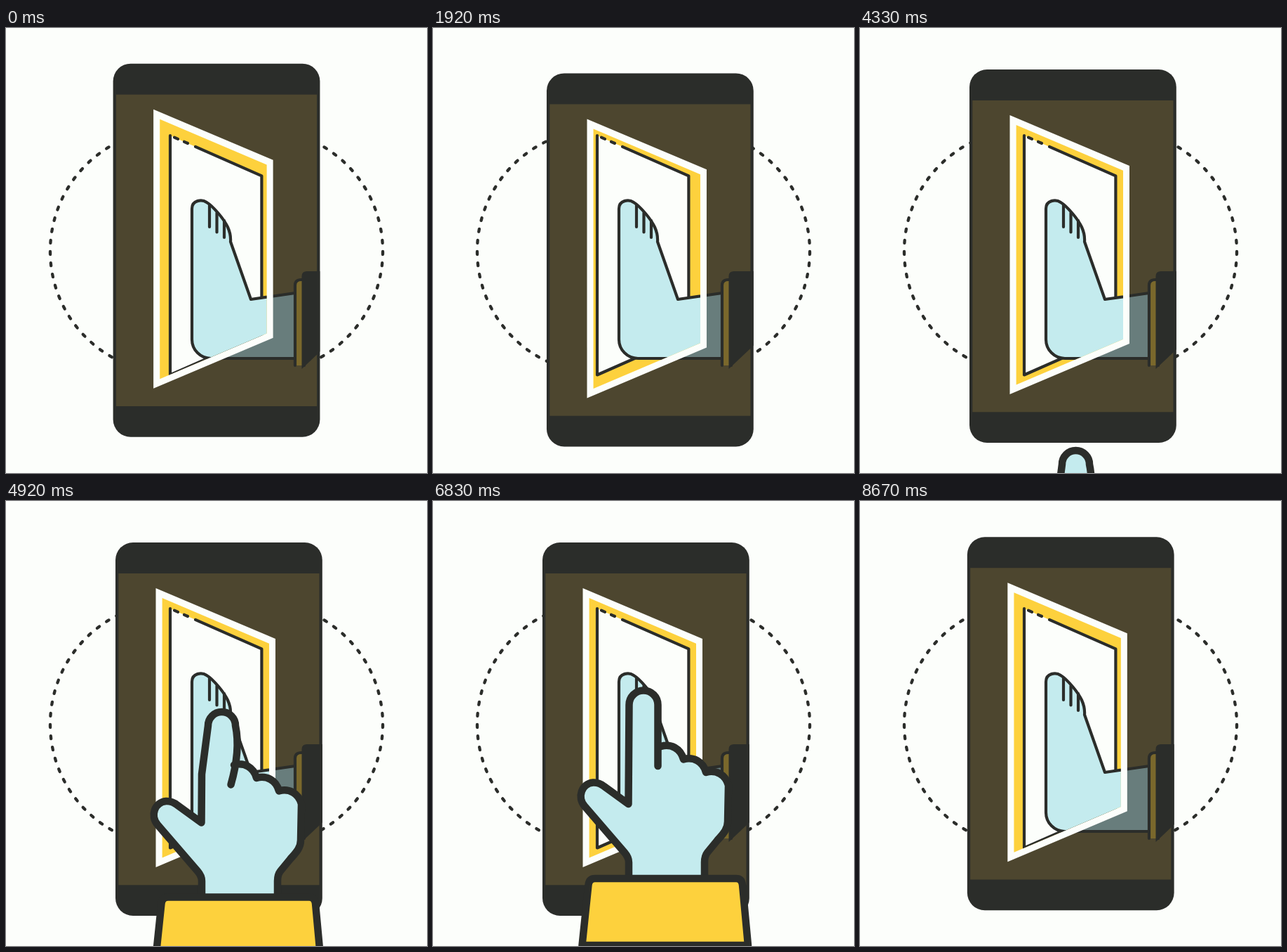
Recreate the animation shown at these times as an HTML page with a canvas. Size 600 by 633 pixels, loop 8760 ms.

```html
<!DOCTYPE html>
<html lang="en">
<head>
<meta charset="utf-8">
<title>Foot in the door</title>
<style>
html, body { margin: 0; width: 100%; height: 100%; overflow: hidden; background: #fcfefb; }
canvas { display: block; width: 600px; height: 633px; }
</style>
</head>
<body>
<canvas id="stage"></canvas>
<script>
const W = 600, H = 633, LOOP = 8760;
const INK = '#2b2d2a', PAPER = '#fcfefb', BROWN = '#4d462f', YELLOW = '#fdd13d',
      SKIN = '#c4ebee', SHADE = '#687d7c', OLIVE = '#7a682c';
const THIN = 4.2, BOLD = 10.5;

const canvas = document.getElementById('stage');
const ctx = canvas.getContext('2d');
const dpr = window.devicePixelRatio || 1;
canvas.width = W * dpr;
canvas.height = H * dpr;

const clamp = v => Math.max(0, Math.min(1, v));
const span = (t, a, b) => clamp((t - a) / (b - a));
const inOut = p => (1 - Math.cos(Math.PI * p)) / 2;
const outSine = p => Math.sin(p * Math.PI / 2);
const mix = (a, b, p) => a + (b - a) * p;

// The phone leaves its rest place, swings through three turning points and settles.
const SWAY_START = 7500;
const SWINGS = [
  { ms: 1560, x: -3.7, y: -9.1 },
  { ms: 850, x: 14.5, y: 24 },
  { ms: 1510, x: -2, y: -12 },
  { ms: 1060, x: 0, y: 0 }
];

function drift(t) {
  let u = (t - SWAY_START + LOOP) % LOOP;
  let from = { x: 0, y: 0 };
  for (const to of SWINGS) {
    if (u < to.ms) {
      const p = inOut(u / to.ms);
      return [mix(from.x, to.x, p), mix(from.y, to.y, p)];
    }
    u -= to.ms;
    from = to;
  }
  return [0, 0];
}

function fill(path, color) {
  ctx.fillStyle = color;
  ctx.fill(path);
}

function stroke(path, width) {
  ctx.strokeStyle = INK;
  ctx.lineWidth = width;
  ctx.stroke(path);
}

// Upright quad in perspective: both slanted edges close in by the same slope.
function door(left, right, top, bottom, slope) {
  const rise = (right - left) * slope;
  return new Path2D(
    `M${left} ${top}L${right} ${top + rise}V${bottom - rise}L${left} ${bottom}Z`);
}

const FRAME = door(213.5, 384, 124, 521, 0.422);
const HOLE = door(222.6, 375, 138, 507.5, 0.425);

const ROOM = { left: 234, right: 364.4, top: 153, bottom: 493.5, slope: 0.44 };
const OPENING = door(ROOM.left, ROOM.right, ROOM.top, ROOM.bottom, ROOM.slope);

function openingLine() {
  const { left, right, top, bottom, slope } = ROOM;
  const lintel = x => top + (x - left) * slope;
  const path = new Path2D(`M${left} ${top}V${bottom}` +
    `L${right} ${bottom - (right - left) * slope}V${lintel(right)}L270 ${lintel(270)}`);
  for (const x of [240, 254]) {
    path.moveTo(x, lintel(x));
    path.lineTo(x + 5, lintel(x + 5));
  }
  return path;
}
const OPENING_LINE = openingLine();

const FOOT = new Path2D(
  'M412 377L349 386L320 304C321 289 314 277 303 264C297 257 291 251 286 248' +
  'C279 243 265 245 265 257V443A27 27 0 0 0 292 470H412');
const TOES = new Path2D();
for (let i = 0; i < 3; i++) {
  TOES.moveTo(290 + 10.5 * i, 252 + 11 * i);
  TOES.lineTo(290 + 10.5 * i, 283 + 7.5 * i);
}
const CUFF = new Path2D('M412 480V366Q412 358 421 358H425V480');
const LEG = new Path2D('M421.5 485V353Q421.5 346 429 346H500V411Z');
const ARM = new Path2D(
  'M212.5 632L221.5 546Q222.5 537 231 537H432Q440 537 441 546L449 632Z');

function dottedRing() {
  ctx.save();
  ctx.strokeStyle = INK;
  ctx.lineWidth = 4.3;
  ctx.setLineDash([4, 12.2]);
  ctx.lineDashOffset = 2;
  for (const side of [-1, 1]) {
    ctx.save();
    ctx.translate(300, 317.5);
    ctx.scale(side, 1);
    for (const dir of [-1, 1]) {
      const first = 2.5 / 173;
      ctx.beginPath();
      ctx.arc(64, 0, 173, first, first + dir * 1.4, dir < 0);
      ctx.stroke();
    }
    ctx.restore();
  }
  ctx.restore();
}

function foot(color) {
  fill(FOOT, color);
  stroke(FOOT, THIN);
  stroke(TOES, THIN);
}

function phone(dx, dy) {
  const body = new Path2D();
  body.roundRect(156 + dx, 59 + dy, 294.8, 531, 25);
  fill(body, INK);
  ctx.fillStyle = BROWN;
  ctx.fillRect(160.3 + dx, 103 + dy, 286.2, 443.3);

  ctx.save();
  ctx.clip(body);
  foot(SHADE);
  fill(CUFF, OLIVE);
  stroke(CUFF, THIN);
  fill(LEG, INK);
  ctx.restore();

  // The frame travels with the phone; the room behind it stays put.
  ctx.save();
  ctx.translate(dx, dy);
  fill(FRAME, PAPER);
  ctx.clip(HOLE);
  ctx.translate(-dx, -dy);
  ctx.fillStyle = YELLOW;
  ctx.fillRect(0, 0, W, H);
  fill(OPENING, PAPER);
  stroke(OPENING_LINE, THIN);
  foot(SKIN);
  ctx.restore();
}

function thumbAndFinger(bend) {
  const path = new Path2D(
    'M279 540V514Q279 507 273 500L216 434C205 421 212 402 228 400.5' +
    'C235 400 239 402 244 406L278.5 431L279 362');
  path.arc(300 + 7.5 * bend, 290 + 3 * bend, 20.5 - bend, Math.PI, 0);
  path.quadraticCurveTo(320.5 + 14 * bend, 328, 320.5, 377);
  return path;
}

function knuckles(path) {
  let x = 325, y = 349;
  for (let i = 0; i < 3; i++) {
    path.bezierCurveTo(x + 14, y - 4, x + 28, y + 3, x += 32, y += 18.5);
  }
  path.lineTo(420, 456);
  path.bezierCurveTo(420, 468, 412, 475, 405, 483);
  path.lineTo(391, 500);
  path.quadraticCurveTo(387, 505, 387, 514);
  path.lineTo(387, 540);
}

function hand(dx, dy, bend) {
  const outline = thumbAndFinger(bend);
  const shape = new Path2D(outline);
  shape.lineTo(325, 349);
  outline.moveTo(325, 349);
  knuckles(shape);
  knuckles(outline);

  ctx.save();
  ctx.translate(dx, dy);
  fill(shape, SKIN);
  stroke(outline, BOLD);
  fill(ARM, YELLOW);
  stroke(ARM, BOLD);
  ctx.restore();
}

function draw(t) {
  ctx.setTransform(dpr, 0, 0, dpr, 0, 0);
  ctx.lineCap = ctx.lineJoin = 'round';
  ctx.fillStyle = PAPER;
  ctx.fillRect(0, 0, W, H);
  dottedRing();
  phone(...drift(t));

  const enter = 370 * (1 - outSine(span(t, 4268, 5130)));
  const leave = 380 * inOut(span(t, 7040, 8600));
  const bend = 1 - inOut(span(t, 5670, 6090));
  if (enter + leave < 370) hand(leave * 0.47, enter + leave, bend);
}

const start = performance.now();
function tick() {
  draw((performance.now() - start) % LOOP);
  requestAnimationFrame(tick);
}
tick();
</script>
</body>
</html>
```
